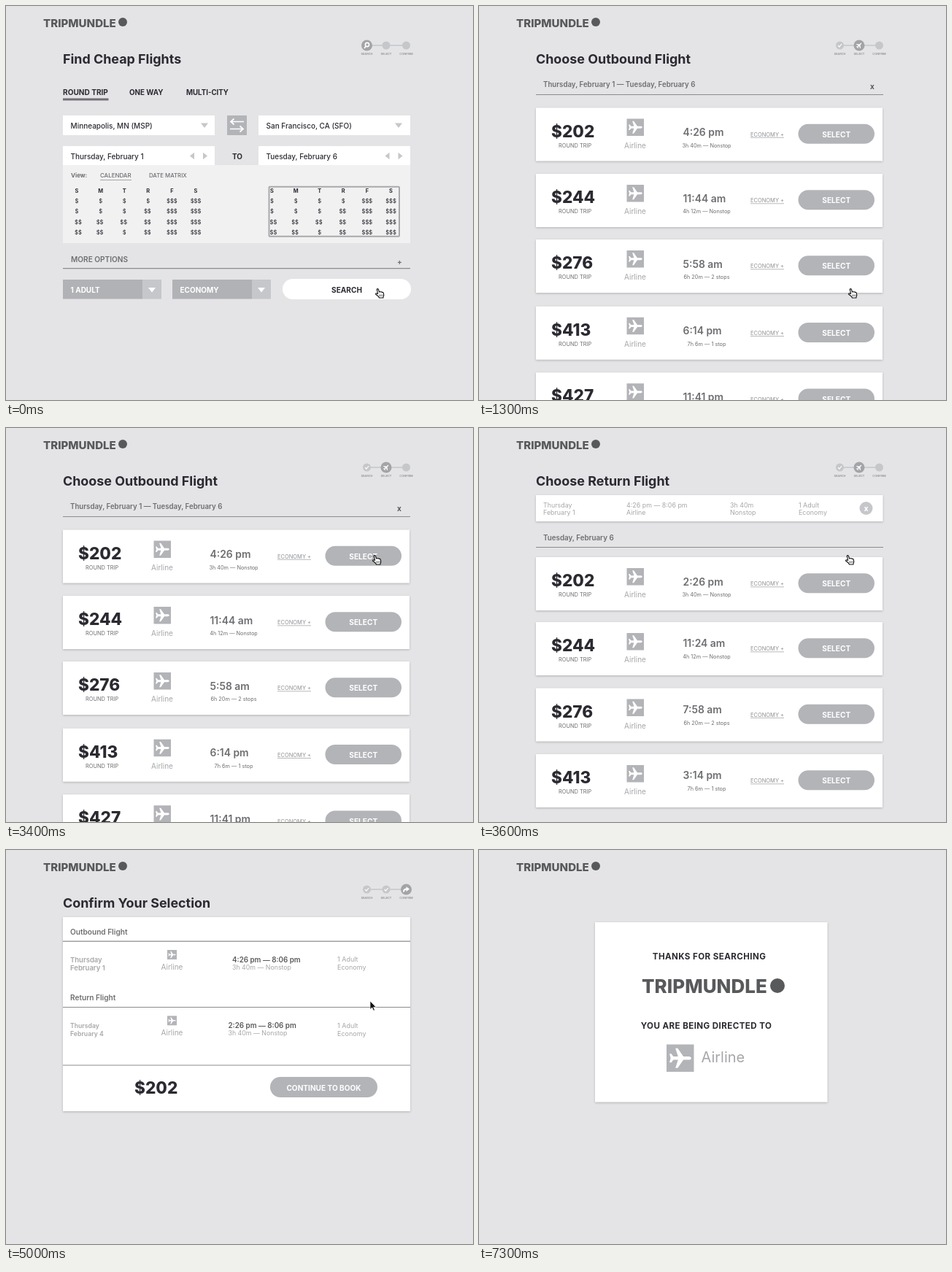
Recreate the animation shown at these times as an HTML page. Size 640 by 540 pixels, loop 7400 ms.

```html
<!DOCTYPE html>
<html lang="en">
<head>
<meta charset="utf-8">
<title>Flight booking walkthrough</title>
<style>
  html, body { margin: 0; width: 100%; height: 100%; overflow: hidden; background: #e4e4e6; }
  svg { display: block; width: 640px; height: 540px; }
  text { font-family: Inter, "Open Sans", Arial, sans-serif; white-space: pre; }
  .card { fill: #fff; filter: drop-shadow(0 1px 1.5px rgba(0, 0, 0, .22)); }
</style>
</head>
<body>
<svg id="stage" viewBox="0 0 640 540" xmlns="http://www.w3.org/2000/svg"></svg>
<script>
const LOOP = 7400;
const INK = '#2b2a31', DARK = '#58595b', GRAY = '#6d6e71', SOFT = '#a6a7aa', PILL = '#b3b4b8', PALE = '#c6c7ca';
const BRAND = 'TRIPMUNDLE';

const text = (x, y, str, size, weight = 400, fill = INK, anchor = 'start', extra = '') =>
  `<text x="${x}" y="${y}" font-size="${size}" font-weight="${weight}" fill="${fill}" text-anchor="${anchor}" ${extra}>${str}</text>`;
const mid = (x, y, str, size, weight, fill, extra) => text(x, y, str, size, weight, fill, 'middle', extra);
const rect = (x, y, w, h, fill, extra = '') =>
  `<rect x="${x}" y="${y}" width="${w}" height="${h}" fill="${fill}" ${extra}/>`;
const card = (x, y, w, h) => rect(x, y, w, h, '#fff', 'class="card"');
const circle = (x, y, r, fill) => `<circle cx="${x}" cy="${y}" r="${r}" fill="${fill}"/>`;
const path = (d, fill, extra = '') => `<path d="${d}" fill="${fill}" ${extra}/>`;
const stroke = (d, color, width, extra = '') =>
  path(d, 'none', `stroke="${color}" stroke-width="${width}" ${extra}`);
const rule = (y, x1 = 78, x2 = 554, color = '#8b8b8e', width = 1.2) => stroke(`M${x1} ${y}H${x2}`, color, width);
const lines = (x, y, step, strs, size, weight, fill) =>
  strs.map((s, i) => text(x, y + i * step, s, size, weight, fill)).join('');
const title = str => text(78, 78.5, str, 17.9, 700);
const pill = (x, y, w, h, label, fill = PILL, ink = '#fff') =>
  rect(x, y, w, h, fill, `rx="${h / 2}"`) + mid(x + w / 2, y + h / 2 + 4.6, label, 10.1, 700, ink);

const PLANE = 'M21.7 12c0-.9-1-1.5-2.3-1.5h-4.6L9.8 3.4H7.8l2.3 7.1H6L4.2 8.2H2.6l1 3.8-1 3.8h1.6L6 13.5h4.1l-2.3 7.1h2l5-7.1h4.6c1.3 0 2.3-.6 2.3-1.5z';
const plane = (x, y, size, extra = '') =>
  `<g transform="translate(${x} ${y}) scale(${size / 24}) ${extra}">${path(PLANE, '#fff')}</g>`;
const planeBox = (x, y, size) => rect(x, y, size, size, PILL) + plane(x, y, size);

const brand = (x, y, size, cx, cy, r) => text(x, y, BRAND, size, 800, DARK) + circle(cx, cy, r, DARK);

function stepper(active) {
  const xs = [494.5, 521, 548.5], names = ['SEARCH', 'SELECT', 'CONFIRM'];
  const icons = [
    '<circle cx="495" cy="53" r="2.6" fill="none" stroke="#fff" stroke-width="1.6"/>' + stroke('M493.2 55L491 58', '#fff', 1.6),
    plane(515.5, 48.5, 11, 'rotate(-45 12 12)'),
    stroke('M545 57.5Q545 53.5 549 53.5', '#fff', 2) + path('M548.5 50.2L553 53.5L548.5 57Z', '#fff')
  ];
  return rule(54, 494, 548, PALE, 1.5) + xs.map((x, i) =>
    circle(x, 54, i === active ? 7.5 : 5.5, i === active ? '#a3a4a8' : PALE) +
    (i === active ? icons[i] : i < active ? stroke(`M${x - 2.4} 54l1.8 2 3.2-4`, '#fff', 1.2) : '') +
    mid(x, 66.5, names[i], 3.9, 600, '#8f9093')).join('');
}

const down = (x, y, fill) => path(`M${x} ${y}h10l-5 6.5z`, fill);
const arrows = x => path(`M${x} 205.5l6-4.7v9.4z`, PALE) + path(`M${x + 24} 205.5l-6-4.7v9.4z`, PALE);
const field = (x, y, str) => rect(x, y, 208, 27, '#fff') + text(x + 10.5, y + 17.7, str, 10, 500);

function calendar(x) {
  const rows = ['1 1 1 1 3 3', '1 1 1 2 3 3', '2 2 2 2 3 3', '2 2 1 2 3 3'];
  const colX = i => x + i * 32.6;
  return [...'SMTRFS'].map((d, i) => mid(colX(i), 255.7, d, 7.4, 700)).join('') +
    rows.map((row, r) => row.split(' ').map((n, i) =>
      mid(colX(i) + (n === '2' ? (i ? -1 : 2) : 0), 270 + r * 14.3, '$'.repeat(n), 7.6, 500)).join('')).join('');
}

function select(x, label) {
  return rect(x, 375, 109, 26.5, '#b1b2b5') + rect(x + 109, 375, 26, 26.5, PALE) +
    down(x + 117, 386, '#fff') + text(x + 10.5, 393, label, 10, 700, '#fff');
}

function searchPage() {
  return stepper(0) + title('Find Cheap Flights') +
    text(78, 122, 'ROUND TRIP', 10.1, 700) + text(169, 122, 'ONE WAY', 9.8, 700) + text(247, 122, 'MULTI-CITY', 9.7, 700) +
    rect(78, 126.5, 62.5, 3, '#736d78') +
    field(78, 150, 'Minneapolis, MN (MSP)') + field(346, 150, 'San Francisco, CA (SFO)') +
    down(267, 160.5, PALE) + down(533, 160.5, PALE) +
    rect(303, 150, 27, 27, PILL) +
    stroke('M326 158.5H308M312.5 154.5L308 158.5L312.5 162.5M307 168.5H325M320.5 164.5L325 168.5L320.5 172.5', '#fff', 1.7) +
    field(78, 192, 'Thursday, February 1') + field(346, 192, 'Tuesday, February 6') +
    arrows(252) + arrows(519.5) + mid(317, 210, 'TO', 10, 700) +
    rect(78, 218, 476, 107, '#f1f1f2') +
    text(89, 235, 'View:', 8, 700, GRAY) + text(129, 235, 'CALENDAR', 7.9, 500, GRAY) +
    rule(238.5, 129, 172, SOFT, 1) + text(196, 235, 'DATE MATRIX', 7.8, 500, GRAY) +
    calendar(97) + calendar(364.5) +
    rect(360.5, 247.8, 178.5, 68, 'none', 'stroke="#a9a9ac" stroke-width="2" rx="1"') +
    text(89, 351, 'MORE OPTIONS', 10.1, 600, GRAY) + mid(539.5, 354, '+', 10, 700, GRAY) + rule(359.7) +
    select(78, '1 ADULT') + select(228, 'ECONOMY') + pill(379, 374, 176, 28, 'SEARCH', '#fff', INK);
}

function flight(y, price, time, detail, lift = 0) {
  return card(78, y, 475, 73) +
    text(99, y + 40, price, 22.6, 800) + text(109, y + 54.3, 'ROUND TRIP', 7.4, 400, GRAY) +
    planeBox(202.5, y + 15, 23.5) + mid(214, y + 55, 'Airline', 10, 400, SOFT) +
    text(279.5, y + 38.7 - lift, time, 13.9, 600, GRAY) + mid(312, y + 54.3 - lift, detail, 7.3, 400, GRAY) +
    text(372, y + 39.3, 'ECONOMY +', 7.5, 400, '#8f9093') + rule(y + 40.8, 372, 418, SOFT, .8) +
    pill(437.5, y + 22.2, 104.5, 27, 'SELECT');
}

const DETAILS = ['3h 40m — Nonstop', '4h 12m — Nonstop', '6h 20m — 2 stops', '7h 6m — 1 stop', '8h 2m — 1 stop'];
const PRICES = ['$202', '$244', '$276', '$413', '$427'];
const flights = (tops, times, lift) =>
  tops.map((y, i) => flight(y, PRICES[i], times[i], DETAILS[i], i ? lift : 0)).join('');

function outboundPage() {
  return stepper(1) + title('Choose Outbound Flight') +
    text(88, 111.3, 'Thursday, February 1 — Tuesday, February 6', 9.7, 600, GRAY) +
    mid(539, 114.3, 'x', 10, 700, DARK) + rule(121.5) +
    flights([139.5, 230, 320, 411.7, 502.3], ['4:26 pm', '11:44 am', '5:58 am', '6:14 pm', '11:41 pm'], 0);
}

function returnPage() {
  const cols = [[88, 'Thursday', 'February 1'], [202, '4:26 pm — 8:06 pm', 'Airline'], [344, '3h 40m', 'Nonstop'], [438, '1 Adult', 'Economy']];
  return stepper(1) + title('Choose Return Flight') + card(78, 92, 475.5, 36) +
    cols.map(([x, ...strs]) => lines(x, 108.7, 10, strs, 8.9, 400, SOFT)).join('') +
    circle(530.5, 110, 9, PALE) + mid(530.5, 113.5, 'x', 9.5, 800, '#fff') +
    text(88, 153.5, 'Tuesday, February 6', 9.8, 600, GRAY) + rule(163.5) +
    flights([177, 266, 356.5, 447], ['2:26 pm', '11:24 am', '7:58 am', '3:14 pm'], 4.3);
}

function leg(y, name, date, dateSize, time, timeX) {
  return text(88, y, name, 10.1, 600, GRAY) + rule(y + 9.5) +
    lines(88, y + 38, 11, date, dateSize, 600, SOFT) +
    planeBox(221, y + 21.3, 13) + mid(227.5, y + 48.2, 'Airline', 10, 400, SOFT) +
    text(timeX, y + 37.8, time, 9.8, 600, DARK) + text(timeX, y + 48, DETAILS[0], 8.8, 400, SOFT) +
    lines(454, y + 37.5, 11, ['1 Adult', 'Economy'], 9, 400, SOFT);
}

function confirmPage() {
  return stepper(2) + title('Confirm Your Selection') + card(78, 92, 476, 266) +
    leg(115.7, 'Outbound Flight', ['Thursday', 'February 1'], 9.5, '4:26 pm — 8:06 pm', 310) +
    leg(206, 'Return Flight', ['Thursday', 'February 4'], 8.7, '2:26 pm — 8:06 pm', 304.5) +
    rule(295) + text(176, 334.3, '$202', 22.6, 800) + pill(362, 311, 147, 28, 'CONTINUE TO BOOK');
}

function thanksPage() {
  const spaced = 'letter-spacing=".4"';
  return card(159, 99, 318.5, 246.5) +
    mid(315.5, 150.3, 'THANKS FOR SEARCHING', 11.6, 700, INK, spaced) +
    brand(223, 195.5, 26, 409, 186, 10) +
    mid(311.5, 245.3, 'YOU ARE BEING DIRECTED TO', 11.6, 700, INK, spaced) +
    planeBox(257, 266.5, 37.5) + text(304.5, 290.7, 'Airline', 20, 400, SOFT);
}

const HAND = 'M2.2 1.2Q3.5-.1 4.4 1.5L5.6 5Q6.8 4 7.6 5Q8.8 4.3 9.4 5.5Q11 5 11.3 6.6L11.8 9Q11.8 10.5 11 11.3V13H5.5Q5 11.5 3.5 10.3L.8 8.2Q.2 6.9 1.6 6.7L3.6 7.4Z';
const ARROW = 'M0 0V11.5L2.7 9L4.6 13.2L6.4 12.4L4.6 8.4H8.2Z';

const pages = [
  { start: 0, draw: searchPage },
  { start: 1300, draw: outboundPage },
  { start: 3600, draw: returnPage },
  { start: 4900, draw: confirmPage },
  { start: 6000, draw: thanksPage }
];

// Pointer tip moves; bend bows the path sideways.
const moves = [
  { start: 1600, end: 2350, from: [509, 387.5], to: [505, 174.5], bend: 5 },
  { start: 4000, end: 4500, from: [505, 174.5], to: [499, 207], bend: 0 },
  { start: 5200, end: 5850, from: [499, 207], to: [467.5, 327.5], bend: 0 }
];
const CURSOR_GONE = 6600;

const stage = document.getElementById('stage');
stage.innerHTML = rect(0, 0, 640, 540, '#e4e4e6') + brand(51, 28.5, 15.1, 160, 22, 6) +
  pages.map(p => `<g class="page">${p.draw()}</g>`).join('') +
  `<g id="cursor">${path(HAND, '#fff', 'id="hand" transform="translate(-3 -.5)" stroke="#111" stroke-width="1.1" stroke-linejoin="round"') +
  stroke('M6 8.5v2.5M8 8.5v2.5M10 8.5v2', '#111', .7, 'id="knuckles" transform="translate(-3 -.5)"') +
  path(ARROW, '#111', 'id="arrow" stroke="#fff" stroke-width=".7"')}</g>`;
const groups = stage.querySelectorAll('.page');
const [cursor, hand, knuckles, arrow] = ['cursor', 'hand', 'knuckles', 'arrow'].map(id => document.getElementById(id));
const show = (el, on) => el.setAttribute('visibility', on ? 'inherit' : 'hidden');

function pointerAt(t) {
  const move = moves.filter(m => t >= m.start).pop();
  if (!move) return moves[0].from;
  const p = Math.min(1, (t - move.start) / (move.end - move.start));
  const e = p * p * (3 - 2 * p);
  const [x0, y0] = move.from, [x1, y1] = move.to;
  return [x0 + (x1 - x0) * e + move.bend * Math.sin(Math.PI * e), y0 + (y1 - y0) * e];
}

function overButton(t, y) {
  const within = (top, height) => y >= top && y <= top + height;
  if (t < 1600 || t >= 6000) return true;
  if (t < 3600) return [161.7, 252.2, 342.2].some(top => within(top, 27));
  if (t < 4900) return t < 4000 || within(199.2, 27);
  return within(311, 28);
}

function render(t) {
  const current = pages.filter(p => t >= p.start).length - 1;
  groups.forEach((g, i) => g.setAttribute('display', i === current ? 'inline' : 'none'));
  const [x, y] = pointerAt(t), pointing = overButton(t, y);
  cursor.setAttribute('transform', `translate(${x.toFixed(2)} ${y.toFixed(2)})`);
  cursor.setAttribute('display', t < CURSOR_GONE ? 'inline' : 'none');
  show(hand, pointing);
  show(knuckles, pointing);
  show(arrow, !pointing);
}

const began = performance.now();
function tick() {
  render((performance.now() - began) % LOOP);
  requestAnimationFrame(tick);
}
tick();
</script>
</body>
</html>
```
